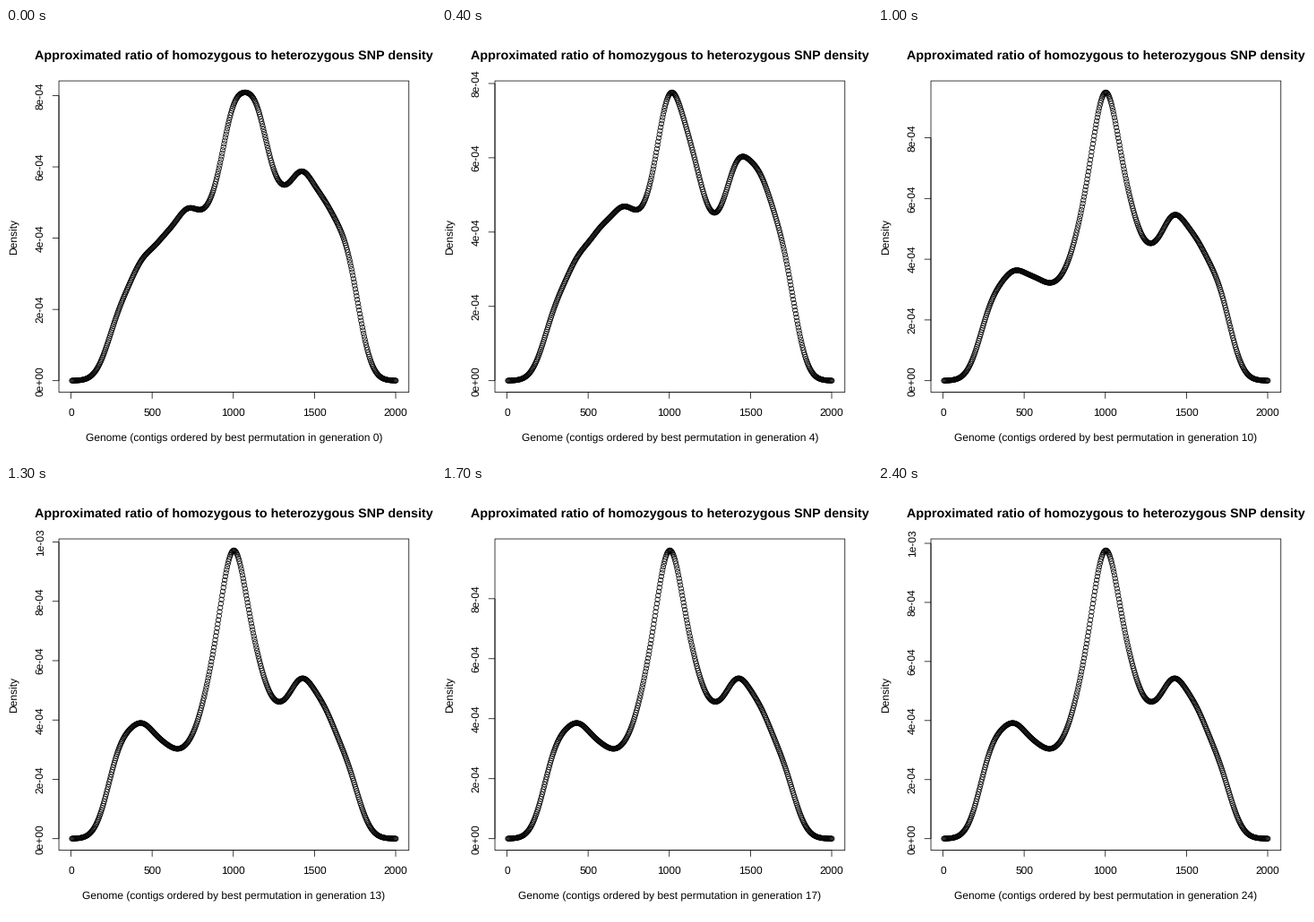
Animation of 480 by 480 pixels, one loop 2.5 s. Source, as a matplotlib script:

```python
import numpy as np
import matplotlib.pyplot as plt
from matplotlib.animation import FuncAnimation
from matplotlib.patches import Rectangle

plt.rcParams["font.family"] = "Liberation Sans"
plt.rcParams["text.hinting"] = "none"

SIZE, DPI = 480, 72            # at 72 dpi one point is one pixel
FRAMES, INTERVAL = 25, 100
LEFT, TOP, WIDTH, HEIGHT = 59.04, 59.04, 390.72, 347.52
BOTTOM = TOP + HEIGHT
MID = LEFT + WIDTH / 2
PAD = 0.04 / 1.08              # margin inside the box, as a share of its size
BASE = BOTTOM - PAD * HEIGHT
SPAN = HEIGHT / 1.08
X0, X_UNIT = 72.5, 362.5 / 2000
TICK, LINE = 7.2, 0.75
BANDWIDTH = 80

# Curve height in pixels at evenly spaced genome positions, by generation.
centres = np.linspace(300, 1700, 11)
SHAPES = {
    0: [77, 128, 154, 181, 192, 289, 291, 210, 220, 190, 138],
    4: [85, 139, 171, 193, 205, 317, 257, 186, 244, 229, 150],
    7: [76, 117, 122, 124, 201, 322, 214, 154, 191, 170, 126],
    13: [103, 129, 107, 108, 193, 322, 215, 153, 179, 148, 87],
}
# Highest density, in units of 1e-4.
PEAKS = {0: 8.09, 4: 7.76, 7: 9.27, 13: 9.716, 17: 9.61, 21: 9.57, 24: 9.76}


def kernel(x):
    return np.exp(-0.5 * ((x[:, None] - centres) / BANDWIDTH) ** 2)


xs = np.linspace(LEFT + PAD * WIDTH, LEFT + (1 - PAD) * WIDTH, 512)
smooth = kernel((xs - X0) / X_UNIT) @ np.linalg.inv(kernel(centres))


def blend(keys, gen):
    return np.interp(gen, list(keys), list(keys.values()))


def curve_at(gen):
    heights = [blend(dict(zip(SHAPES, column)), gen)
               for column in zip(*SHAPES.values())]
    y = smooth @ heights
    return BASE - SPAN * y / y.max()


fig = plt.figure(figsize=(SIZE / DPI, SIZE / DPI), dpi=DPI, facecolor="white")
ax = fig.add_axes([0, 0, 1, 1])
ax.set_xlim(0, SIZE)
ax.set_ylim(SIZE, 0)
ax.axis("off")


def label(x, y, text, size=12, **kw):
    return ax.text(x, y, text, size=size, ha="center", va="baseline",
                   rotation_mode="anchor", **kw)


def line(x, y):
    return ax.plot(x, y, color="black", lw=LINE, snap=False,
                   solid_capstyle="butt")[0]


ax.add_patch(Rectangle((LEFT, TOP), WIDTH, HEIGHT, fill=False, ec="black",
                       lw=LINE, snap=False))
label(MID, 34.7, "Approximated ratio of homozygous to heterozygous SNP density",
      14.4, weight="bold")
label(12.96, TOP + HEIGHT / 2, "Density", rotation=90)
caption = label(MID, 461.8, "")

line([X0, X0 + 2000 * X_UNIT], [BOTTOM, BOTTOM])
for value in range(0, 2001, 500):
    x = X0 + value * X_UNIT
    line([x, x], [BOTTOM, BOTTOM + TICK])
    label(x, 432.5, str(value))

y_axis = line([LEFT, LEFT], [BASE, BASE])
y_ticks = [(v, line([LEFT - TICK, LEFT], [BASE, BASE]),
            label(41.76, BASE, f"{v * 1e-4:.0e}", rotation=90))
           for v in range(0, 11, 2)]

dots = ax.scatter(xs, xs, s=5.4 ** 2, facecolors="none",
                  edgecolors=["black", "black"], linewidths=LINE, zorder=3)


def update(gen):
    peak = blend(PEAKS, gen)
    dots.set_offsets(np.column_stack([xs, curve_at(gen)]))
    caption.set_text(f"Genome (contigs ordered by best permutation in generation {gen})")
    for value, mark, text in y_ticks:
        y = BASE - SPAN * value / peak
        shown = value <= 1.04 * peak
        mark.set_ydata([y, y])
        text.set_y(y)
        mark.set_visible(shown)
        text.set_visible(shown)
        if shown:
            y_axis.set_ydata([BASE, y])
    return [dots, caption]


anim = FuncAnimation(fig, update, frames=FRAMES, interval=INTERVAL,
                     repeat=True, repeat_delay=0, blit=False)
plt.show()
```
